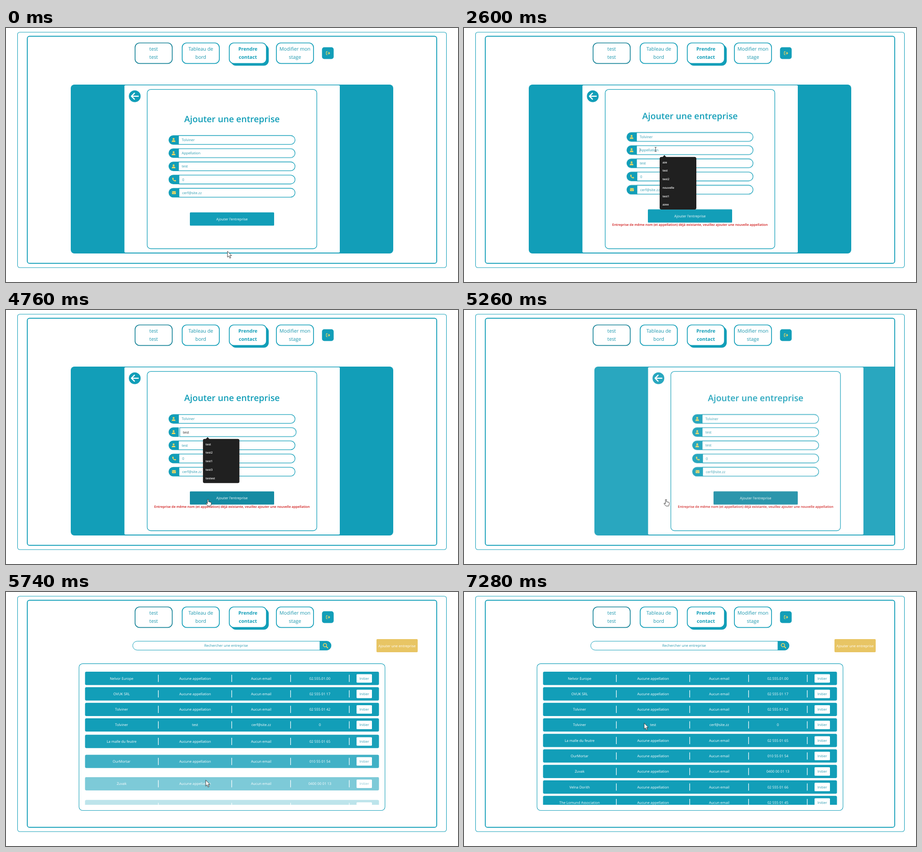
An HTML page for the animation above (7300 ms loop, 998 by 561 pixels).

```html
<!DOCTYPE html>
<html lang="fr">
<head>
<meta charset="utf-8">
<title>Ajouter une entreprise</title>
<style>
  html, body { margin: 0; width: 100%; height: 100%; overflow: hidden; background: #fff; }
  svg { display: block; width: 100vw; height: 100vh; }
  :root { --teal: #129eb8; --gold: #f3d860; }
  text { font: 7.8px "Open Sans", "Noto Sans", sans-serif; text-rendering: geometricPrecision; fill: #fff; }
  .mid { text-anchor: middle; }
  .teal { fill: var(--teal); }
  .ink { fill: #2799af; }
  .dark { fill: #222; }
  .gold { fill: var(--gold); }
  .line { fill: none; stroke: var(--teal); }
  .box { fill: #fff; stroke: var(--teal); stroke-width: 1.3; }
  .goldline { fill: none; stroke: var(--gold); stroke-width: 1.2; stroke-linecap: round; stroke-linejoin: round; }
  .nav text { font-size: 10.8px; fill: #1b97ae; }
  .nav .on text { font-size: 10.6px; font-weight: 700; fill: var(--teal); }
  .title { font-size: 19.3px; font-weight: 600; }
  .error { font-size: 7.32px; font-weight: 600; fill: #cf1616; }
  .popup text { font-size: 6.3px; font-weight: 600; }

  /* One loop is 7300 ms: 1% = 73 ms */
  .a { animation: 7300ms step-end infinite both; }
  .exit { animation-name: exit; }
  .lift { animation-name: lift; }
  .error { animation-name: error; }
  .hover { animation-name: hover; }
  .nudge { animation-name: nudge; }
  .hint { animation-name: hint; }
  .caret { animation-name: caret; }
  .typed { animation-name: second; }
  .letter { animation-name: letter; }
  .done { animation-name: done; }
  .first { animation-name: first; }
  .second { animation-name: second; }
  .list { animation-name: list; }
  .row { animation-name: rise; }
  .cursor { animation-name: move; animation-timing-function: ease-in-out; }
  .arrow { animation-name: arrow; }
  .beam { animation-name: beam; }
  .hand { animation-name: hand; }

  @keyframes exit {
    0%, 70.685% { transform: none; opacity: 1; animation-timing-function: cubic-bezier(.37, 0, .63, 1); }
    77.534%, 100% { transform: translateX(1510px); opacity: 0; }
  }
  @keyframes lift { 0% { transform: none; } 10.411%, 100% { transform: translateY(-6.7px); } }
  @keyframes error {
    0%, 10.411% { transform: translateY(26px); opacity: 0; animation-timing-function: ease-in-out; }
    17.26%, 100% { transform: none; opacity: 1; }
  }
  @keyframes hover {
    0% { fill: #129eb8; } 6.44% { fill: #168ba3; }
    22.74% { fill: #129eb8; } 58.22%, 100% { fill: #168ba3; }
  }
  @keyframes nudge {
    0% { transform: none; }
    35.616% { transform: none; animation-timing-function: ease; }
    38.356% { transform: translateX(2.5px); }
    66.575%, 100% { transform: none; }
  }
  @keyframes hint { 0% { opacity: 1; } 43.836%, 100% { opacity: 0; } }
  @keyframes caret { 0% { opacity: 0; } 34.52% { opacity: 1; } 43.836%, 100% { opacity: 0; } }
  @keyframes first { 0% { opacity: 0; } 34.52% { opacity: 1; } 43.836%, 100% { opacity: 0; } }
  @keyframes second { 0% { opacity: 0; } 43.836% { opacity: 1; } 66.575%, 100% { opacity: 0; } }
  @keyframes letter { 0% { visibility: hidden; } 43.836%, 100% { visibility: visible; } }
  @keyframes done { 0% { opacity: 0; } 66.575%, 100% { opacity: 1; } }
  @keyframes list { 0% { opacity: 0; } 75.616%, 100% { opacity: 1; } }
  @keyframes rise {
    0%, 72.192% { transform: translateY(60px); opacity: 0; animation-timing-function: cubic-bezier(.37, 0, .63, 1); }
    76.301%, 100% { transform: none; opacity: 1; }
  }
  @keyframes move {
    0% { transform: translate(489px, 493px); }
    9.315%, 20.548% { transform: translate(470px, 420px); }
    30.137%, 53.973% { transform: translate(423px, 268px); }
    59.452%, 74.5% { transform: translate(446px, 418px); }
    75.8% { transform: translate(443px, 416px); }
    83.01% { transform: translate(436.7px, 414px); }
    85.75% { transform: translate(435px, 416px); }
    95.616%, 96.164% { transform: translate(391px, 294px); }
    99.726%, 100% { transform: translate(397.7px, 289.5px); }
  }
  @keyframes arrow {
    0% { opacity: 1; } 6.44% { opacity: 0; }
    22.74% { opacity: 1; } 24.4% { opacity: 0; }
    56.7% { opacity: 1; } 58.22% { opacity: 0; }
    78.1%, 100% { opacity: 1; }
  }
  @keyframes beam {
    0% { opacity: 0; } 24.4% { opacity: 1; } 43.836% { opacity: 0; }
    53.973% { opacity: 1; } 56.7% { opacity: 0; }
    75.068% { opacity: 1; } 78.1%, 100% { opacity: 0; }
  }
  @keyframes hand {
    0% { opacity: 0; } 6.44% { opacity: 1; } 22.74% { opacity: 0; }
    58.22% { opacity: 1; } 75.068%, 100% { opacity: 0; }
  }
</style>
</head>
<body>
<svg viewBox="0 0 998 561">
  <defs>
    <clipPath id="page"><rect x="47" y="18" width="903.5" height="502"/></clipPath>
    <clipPath id="rows"><rect x="170" y="170" width="660" height="299.5"/></clipPath>
  </defs>

  <g clip-path="url(#page)">
    <g class="a exit">
      <rect class="teal" x="143" y="125" width="712" height="373" rx="8"/>
      <rect x="261.5" y="126.5" width="475.5" height="369.5" rx="2" fill="#fff"/>
      <circle class="teal" cx="284.3" cy="150.7" r="13"/>
      <path d="M292 150.7H277.5M283.5 144.2L277 150.7L283.5 157.2" fill="none" stroke="#fff" stroke-width="2.5" stroke-linecap="round" stroke-linejoin="round"/>
      <rect class="line" x="311.7" y="135.6" width="374.6" height="351.9" rx="8" stroke-width="1.3"/>
      <g class="a lift">
        <text class="mid teal title" x="499" y="207.5">Ajouter une entreprise</text>
        <g id="fields"></g>
        <rect class="a hover" x="406" y="407.2" width="186" height="29.3" rx="1.5"/>
        <text class="mid" x="499" y="424.7">Ajouter l'entreprise</text>
      </g>
      <text class="mid a error" x="499" y="437.2">Entreprise de même nom (et appellation) déjà existante, veuillez ajouter une nouvelle appellation</text>
    </g>
  </g>

  <g class="a list">
    <rect class="line" x="279.8" y="108.7" width="437.8" height="19.6" rx="9.8"/>
    <path class="teal" d="M692.5 108.2H708A10.3 10.3 0 0 1 708 128.8H692.5Z"/>
    <circle class="goldline" cx="704.2" cy="117.4" r="3.7" style="stroke-width:1.6"/>
    <path class="goldline" d="M707.2 120.4L710.3 123.5" style="stroke-width:1.9"/>
    <text class="mid ink" x="486" y="121.3">Rechercher une entreprise</text>
    <rect x="818" y="104" width="91" height="29" rx="2" fill="#e8c564"/>
    <text class="mid" x="863.3" y="121.5">Ajouter une entreprise</text>
    <rect class="line" x="161.2" y="158.4" width="675.6" height="324.1" rx="8" stroke-width="1.1"/>
    <g id="list" clip-path="url(#rows)"></g>
  </g>

  <rect class="line" x="25.5" y="9.2" width="947" height="520.1" rx="5" stroke-width="1.1"/>
  <rect class="line" x="47" y="18.3" width="904" height="501.5" rx="5" stroke-width="1.9"/>
  <g class="nav" id="nav"></g>
  <rect class="teal" x="697.7" y="42.6" width="25.8" height="25.9" rx="5"/>
  <path class="goldline" d="M709.5 52.2H708.2Q707.2 52.2 707.2 53.2V58Q707.2 59 708.2 59H709.5M710.3 55.6H714.6M712.4 53.1L714.9 55.6L712.4 58.1"/>

  <g id="popups"></g>

  <g class="a cursor" stroke="#222" stroke-width=".9" stroke-linejoin="round" fill="#fff">
    <path class="a arrow" d="M0 0V13.2L3 10.5L5.1 15.4L7.3 14.5L5.2 9.7H9.3Z"/>
    <path class="a beam" fill="none" d="M-2-4.5H-.6L0-4L.6-4.5H2M0-4V4M-2 4.5H-.6L0 4L.6 4.5H2"/>
    <path class="a hand" d="M-1.2 1Q0-.8 1.2 1V5.5L6 6.6Q7.5 7 7.4 8.6L6.6 13.5Q6.4 15 5 15H.6Q-.4 15-1 14L-4.3 10Q-4.6 8.4-3 8.6L-1.2 10Z"/>
  </g>
</svg>

<script>
  const fill = (id, parts) => document.getElementById(id).innerHTML = parts.join('');
  const label = (x, y, s, cls = 'mid') => `<text class="${cls}" x="${x}" y="${y}">${s}</text>`;

  // Navigation
  const tabs = [['test', 'test'], ['Tableau de', 'bord'], ['Prendre', 'contact'], ['Modifier mon', 'stage']];
  fill('nav', tabs.map(([top, low], i) => {
    const x = 285 + 104 * i, on = i === 2;
    const shadow = on ? `<rect class="teal" x="${x + 3.6}" y="36.8" width="83.5" height="46.5" rx="11"/>` : '';
    return `<g class="${on ? 'on' : ''}">${shadow}
      <rect class="box" x="${x}" y="33" width="82" height="45.4" rx="10" style="stroke-width:1.7${i ? '' : ';stroke:#178398'}"/>
      ${label(x + 41, 50.4, top)}${label(x + 41, 67.5, low)}</g>`;
  }));

  // Form fields
  const icons = {
    user: '<circle class="gold" cx="370" cy="-2.1" r="2.1"/><path class="gold" d="M366 4.2Q366 .8 369 .8H371Q374 .8 374 4.2Z"/>',
    phone: '<path class="gold" d="M367.3-3.7L369.2-4.2L370.5-1.6L369.4-.5Q370.3 1.2 372 2L373.1 .9L375.6 2.1L375 4Q371.5 4.6 369 1.8Q366.4-1 367.3-3.7Z"/>',
    mail: '<rect class="gold" x="366.5" y="-3.3" width="8.6" height="6.6" rx="1"/><path class="line" d="M366.5-1.7L370.8 1.2L375.1-1.7" stroke-width=".7"/>'
  };
  const letters = [...'test'].map((c, i) =>
    `<tspan class="a letter" style="animation-delay:${180 * i}ms">${c}</tspan>`).join('');
  const second = label(388, 2.8, 'Appellation', 'ink a hint') + label(388, 2.8, letters, 'dark a typed') +
    label(388, 2.8, 'test', 'ink a done') +
    '<path class="a caret" d="M388.3-5V5" stroke="#456" stroke-width=".7"/>';
  const fields = [['user', 'Tolviner'], ['user', second], ['user', 'test'], ['phone', '0'], ['mail', 'cerf@site.zz']];
  fill('fields', fields.map(([icon, value], i) => {
    const d = i > 2 ? 1 : 0, focus = i === 1;
    return `<g transform="translate(0 ${247.3 + 29.13 * i})">
      <path class="teal" d="M${381.4 + d}-10.4H369.4A10.4 10.4 0 0 0 369.4 10.4H${381.4 + d}Z"/>${icons[icon]}
      <g class="${focus ? 'a nudge' : ''}">
        <path class="box" d="M${381 + d}-9.8H628.4A9.8 9.8 0 0 1 628.4 9.8H${381 + d}Z"/>
        ${focus ? value : label(388 + d, 2.8, value, 'ink')}
      </g></g>`;
  }));

  // Suggestions
  const popup = (cls, x, words) => {
    const h = 4 + 18.7 * words.length;
    return `<g class="popup a ${cls}" transform="translate(${x} 0)">
      <path d="M5.5 286L10.5 280.8L15.5 286Z" fill="#202020"/>
      <rect y="284.8" width="81" height="${h}" rx="4" fill="#202020"/>
      ${words.map((w, i) => label(6.2, 298.7 + 18.72 * i, w, '')).join('')}</g>`;
  };
  fill('popups', [
    popup('first', 432, ['aze', 'test', 'test2', 'nouvelle', 'test1', 'azee']),
    popup('second', 434.6, ['test', 'test2', 'test1', 'test3', 'testest'])
  ]);

  // Company list
  const none = 'Aucune appellation', noMail = 'Aucun email';
  const firms = [
    ['Nelvor Europe', '02.555.01.00'], ['OVUK SRL', '02 555 01 17'], ['Tolviner', '02 555 01 42'],
    ['Tolviner', '0', 'test', 'cerf@site.zz'], ['La malle du feutre', '02 555 01 65'],
    ['OurMortar', '010 55 01 54'], ['Zuvak', '0400 00 01 13'], ['Velna Dorith', '02 555 01 66'],
    ['The Lomund Association', '02 555 01 45']
  ];
  fill('list', firms.map(([name, phone, alias = none, mail = noMail], i) =>
    `<g transform="translate(0 ${190.8 + 34.27 * i})"><g class="a row" style="animation-delay:${52 * i}ms">
      <rect class="teal" x="174.5" y="-14.7" width="649" height="29.4" rx="3"/>
      <path d="M336.4-8V8M498.4-8V8M628.4-8V8M757.9-8V8" stroke="#fff" stroke-width="1.3"/>
      ${label(255.2, 2.8, name)}${label(417.5, 2.8, alias)}${label(563.5, 2.8, mail)}${label(693, 2.8, phone)}
      <rect x="774" y="-9.4" width="34" height="18.8" rx="1.6" fill="#fff"/>${label(791, 2.8, 'Initier', 'mid ink')}
    </g></g>`));
</script>
</body>
</html>
```
